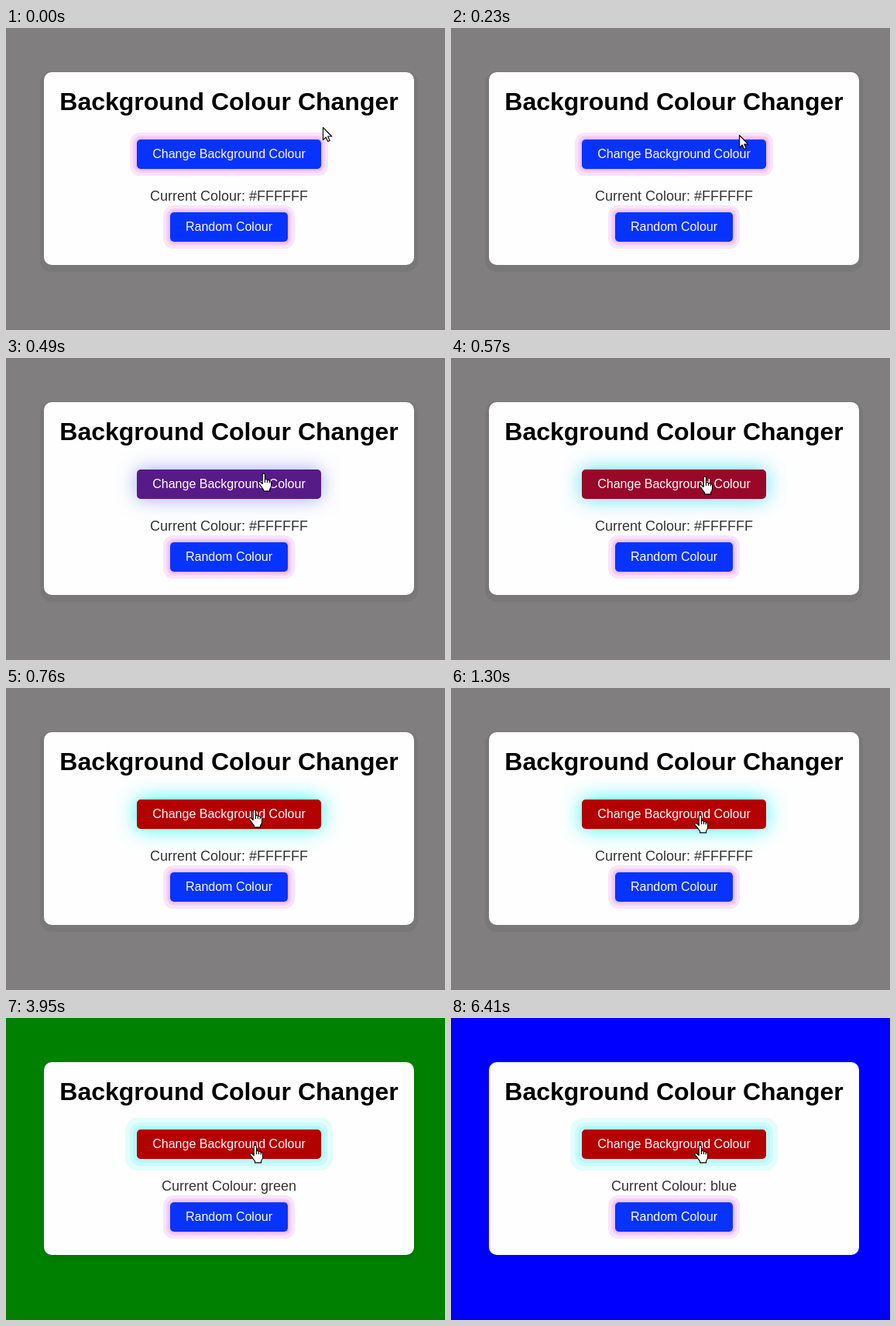
An HTML page for the animation above (8000 ms loop, 567 px wide and 390 px high).

```html
<!DOCTYPE html>
<html lang="en">
<head>
<meta charset="utf-8">
<title>Background Colour Changer</title>
<style>
  html, body { margin: 0; width: 100%; height: 100%; overflow: hidden; }
  body { position: relative; font-family: "Liberation Sans", Arial, sans-serif; text-align: center; }
  #card { position: absolute; left: 49px; top: 57px; width: 478px; height: 249px; border-radius: 10px; background: #fefefe; }
  #card > * { position: absolute; margin: 0; white-space: nowrap; }
  h1 { left: 0; right: 0; top: 20px; font-size: 32px; line-height: 36px; color: #000; }
  p { left: 0; right: 0; top: 150px; font-size: 18px; line-height: 20px; color: #333; }
  .button { height: 38px; border-radius: 5px; font-size: 16px; line-height: 37px; color: #fff; background: #0733ff; }
  #change { left: 120px; top: 87px; width: 238px; }
  #random { left: 163px; top: 181px; width: 152px; }
  svg { position: absolute; left: 0; top: 0; width: 24px; height: 28px; overflow: visible; }
  svg path { fill: #fff; stroke: #000; stroke-width: 1.1; stroke-linejoin: round; }
</style>
</head>
<body>
<div id="card">
  <h1>Background Colour Changer</h1>
  <div class="button" id="change">Change Background Colour</div>
  <p>Current Colour: <span id="name"></span></p>
  <div class="button" id="random">Random Colour</div>
</div>
<svg id="cursor">
  <path id="arrow" d="M.5 .5V16.5L4.2 13L6.8 18.6L9.2 17.5L6.7 12H11.8Z"/>
  <g id="hand" transform="translate(-8 -.5)">
    <path d="M6.2 14V2.3Q6.2 .6 7.8 .6T9.4 2.3V8.4Q11.8 7 12.4 9.3Q14.6 8.2 15.2 10.4Q17.6 9.8 17.6 12.4V16Q17.6 19 15.6 20.8V23.4H7.6V21.4Q5 18.5 3.2 15.4Q1 13.4 .8 12.3Q1.6 10.4 3.6 11.6Z"/>
    <path d="M9.4 8V12.5M12.4 9.3V12.5M15.2 10.4V13"/>
  </g>
</svg>
<script>
const LOOP = 8000, HOVER = 408, FADE = 300;
const $ = id => document.getElementById(id);

const pages = [
  { at: 0, colour: '#807e7f', name: '#FFFFFF', shadow: '0 4px 0 5px #797878' },
  { at: 1580, colour: '#ff0000', name: 'red', shadow: 'none' },
  { at: 3950, colour: '#008000', name: 'green', shadow: '0 4px 8px rgba(0,0,0,.1)' },
  { at: 6410, colour: '#0000ff', name: 'blue', shadow: 'none' }
];

// time, x, y
const path = [[0, 409, 128], [20, 409, 128], [440, 336, 147], [570, 328, 153],
  [760, 321, 157], [1190, 321, 157], [1300, 322, 164], [LOOP, 322, 164]];

const rings = list => list.map(([size, colour]) => `0 0 0 ${size}px ${colour}`).join();
const pinkRings = rings([[2, '#ebbcf1'], [5, '#f4cff6'], [9, '#fae4fa']]);
const cyanRings = rings([[5, '#b8f8f9'], [9, '#cbfbfc'], [15, '#e3fdfd']]);

const mix = (a, b, k) => a.map((v, i) => v + (b[i] - v) * k);

// cubic-bezier(.25, .1, .25, 1)
function ease(x) {
  if (x <= 0 || x >= 1) return x <= 0 ? 0 : 1;
  const bezier = (s, p, q) => 3 * s * (1 - s) ** 2 * p + 3 * s * s * (1 - s) * q + s ** 3;
  let low = 0, high = 1;
  for (let i = 0; i < 20; i++) {
    const mid = (low + high) / 2;
    if (bezier(mid, .25, .25) < x) low = mid; else high = mid;
  }
  return bezier(low, .1, 1);
}

function cursorAt(t) {
  const i = path.findIndex(point => point[0] > t);
  const a = path[i - 1], b = path[i];
  return mix(a, b, (t - a[0]) / (b[0] - a[0])).slice(1);
}

function glow(t, k) {
  if (t < HOVER) return pinkRings;
  if (t >= pages[1].at) return cyanRings;
  const [r, g, b, alpha, blur] = mix([225, 60, 225, .7, 20], [0, 245, 245, .8, 27], k);
  return `0 0 ${blur}px rgba(${r},${g},${b},${alpha})`;
}

function draw(t) {
  const page = pages.findLast(p => p.at <= t);
  document.body.style.background = page.colour;
  $('card').style.boxShadow = page.shadow;
  $('name').textContent = page.name;

  const k = ease((t - HOVER) / FADE);
  $('change').style.background = `rgb(${mix([7, 51, 255], [179, 0, 0], k)})`;
  $('change').style.boxShadow = glow(t, k);

  const [x, y] = cursorAt(t).map(Math.round);
  $('cursor').style.transform = `translate(${x}px,${y}px)`;
  $('arrow').style.display = t < HOVER ? '' : 'none';
  $('hand').style.display = t < HOVER ? 'none' : '';
}

$('random').style.boxShadow = pinkRings;
const start = performance.now();
function tick() {
  draw((performance.now() - start) % LOOP);
  requestAnimationFrame(tick);
}
tick();
</script>
</body>
</html>
```
